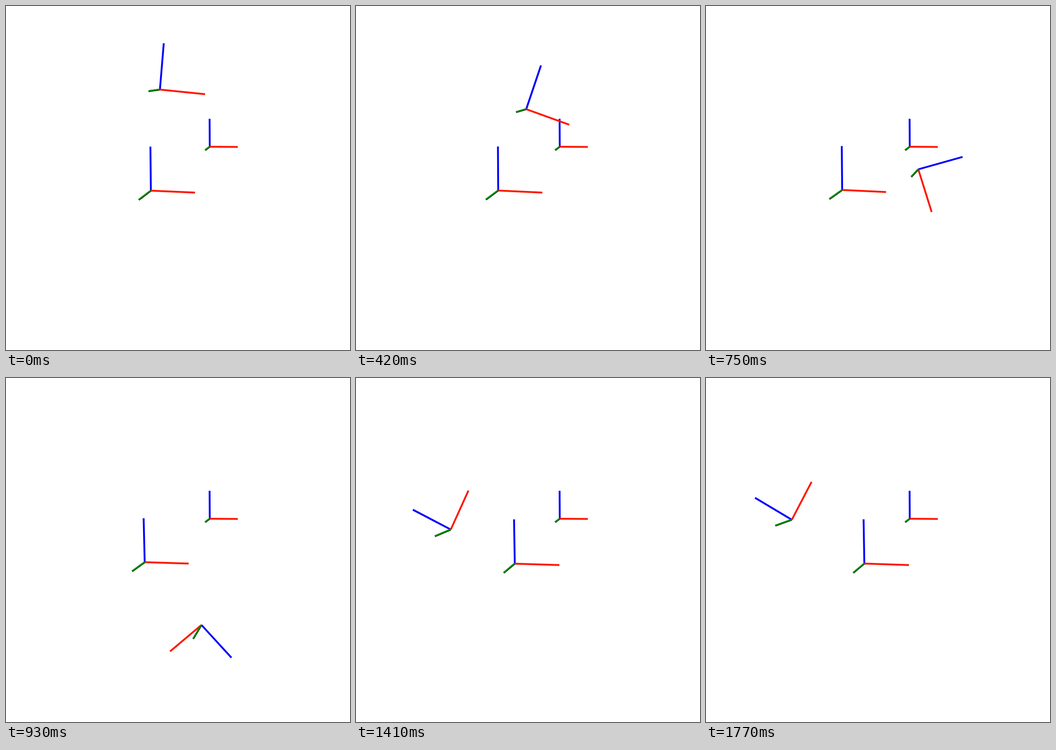
Write an HTML page with a canvas that moves like this. It is 748 px wide and 748 px high and loops after 1800 ms.

```html
<!DOCTYPE html>
<html lang="en">
<head>
<meta charset="utf-8">
<title>Swinging coordinate frames</title>
<style>
  html, body { margin: 0; width: 100%; height: 100%; overflow: hidden; background: #fff; }
  canvas { display: block; width: 748px; height: 748px; }
</style>
</head>
<body>
<canvas id="stage" width="748" height="748"></canvas>
<script>
const ctx = document.getElementById('stage').getContext('2d');
const LOOP = 1800, STEPS = 39, TICK = 30, RAD = Math.PI / 180;

// Perspective view of the swing plane (x right, z up).
const ORIGIN = [315, 401], X_AXIS = [94.6, 3.5], Z_AXIS = [-1.5, -94.6];
const FADE_X = -0.0155, FADE_Z = -0.01285;
const VANISH = [666, 135];

// Key poses of the rod: step, angle from upright in degrees, length.
const SWING = [
  [0, 6, 2.27], [5, 10.2, 2.02], [12, 35.3, 1.906],
  [16.5, 79.5, 1.79], [20, 137.4, 1.896], [22.5, 188.7, 2.02],
  [25, 237.9, 1.948], [30, 296.6, 1.642], [34.5, 304.8, 2.07], [38, 299.9, 1.917]
];

// Smooth curve through column c of the key poses.
function swing(c, t) {
  const last = SWING.length - 1;
  const chord = i => (SWING[i + 1][c] - SWING[i][c]) / (SWING[i + 1][0] - SWING[i][0]);
  const slope = i => {
    if (i === 0) return chord(0);
    if (i === last) return chord(last - 1);
    const before = SWING[i][0] - SWING[i - 1][0], after = SWING[i + 1][0] - SWING[i][0];
    return (chord(i - 1) * after + chord(i) * before) / (before + after);
  };
  let i = 0;
  while (i < last - 1 && t >= SWING[i + 1][0]) i++;
  const a = SWING[i], b = SWING[i + 1];
  const d = b[0] - a[0], u = (t - a[0]) / d, v = 1 - u;
  return a[c] * v * v * (1 + 2 * u) + b[c] * u * u * (3 - 2 * u)
    + d * u * v * (slope(i) * v - slope(i + 1) * u);
}

function project(x, z) {
  const w = 1 + FADE_X * x + FADE_Z * z;
  return ORIGIN.map((p, i) => p + (x * X_AXIS[i] + z * Z_AXIS[i]) / w);
}

function line(a, b, color, width = 4) {
  ctx.strokeStyle = color;
  ctx.lineWidth = width;
  ctx.beginPath();
  ctx.moveTo(...a);
  ctx.lineTo(...b);
  ctx.stroke();
}

function drawAxes(o, xTip, zTip, reach) {
  line(o, zTip, '#0000ff');
  line(o, xTip, '#ff1800');
  const yTip = o.map((p, i) => p + (p - VANISH[i]) * reach);
  line(o, yTip, '#004000');
  // Lit upper side of the green rod
  const dx = yTip[0] - o[0], dy = yTip[1] - o[1], n = Math.hypot(dx, dy);
  const shift = p => [p[0] - dy / n * .7, p[1] + dx / n * .7];
  line(shift(o), shift(yTip), '#009000', 2.6);
}

function drawFrame(x, z, degrees, size = 1) {
  const s = size * Math.sin(degrees * RAD), c = size * Math.cos(degrees * RAD);
  drawAxes(project(x, z), project(x + c, z - s), project(x + s, z + c), .075);
}

function draw(step) {
  const angle = swing(1, step), length = swing(2, step);
  const s = Math.sin(angle * RAD), c = Math.cos(angle * RAD);
  // The pivot recoils and rocks against the rod.
  const x = .029 - .283 * s + .045 * s * s;
  const z = .01 * (s - .7);
  const tilt = .2 + 1.2 * s * c;

  ctx.fillStyle = '#fff';
  ctx.fillRect(0, 0, 748, 748);
  drawAxes([443, 306], [504, 306.6], [442.7, 245.3], .045);
  drawFrame(x, z, tilt);
  drawFrame(x + length * s, z + length * c, angle - .4, .99);
}

const start = performance.now();
function tick() {
  const t = Math.max(0, performance.now() - start) % LOOP;
  const held = Math.floor(t / TICK) * TICK;
  draw(Math.floor(held * STEPS / LOOP));
  requestAnimationFrame(tick);
}
tick();
</script>
</body>
</html>
```
